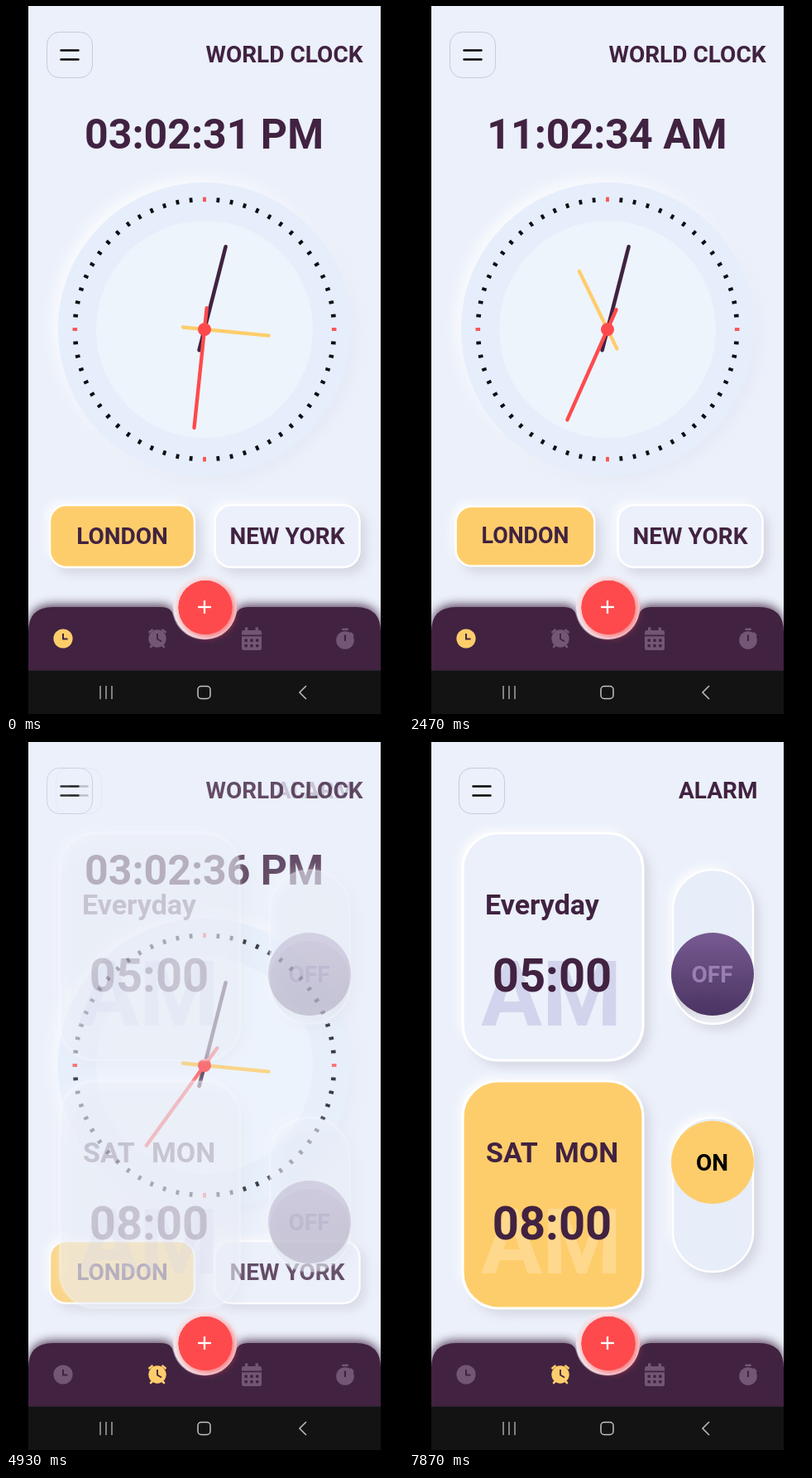
An HTML page with a canvas for the animation above (8000 ms loop, 480x854 px).

```html
<!DOCTYPE html>
<html lang="en">
<head>
<meta charset="utf-8">
<title>World clock</title>
<style>
html, body { margin: 0; width: 100%; height: 100%; overflow: hidden; background: #000; }
canvas { display: block; width: 480px; height: 854px; }
</style>
</head>
<body>
<canvas id="stage"></canvas>
<script>
const LOOP = 8000;
const canvas = document.getElementById('stage');
const g = canvas.getContext('2d');
const dpr = window.devicePixelRatio || 1;
canvas.width = 480 * dpr;
canvas.height = 854 * dpr;

const BG = [235, 240, 250], YELLOW = [254, 205, 107];
const PLUM = '#412241', RED = '#fe4a4c', GOLD = '#fecd6b', DIM = '#735675';

const clamp = v => Math.max(0, Math.min(1, v));
const ramp = (t, a, b) => clamp((t - a) / (b - a));
const ease = p => p * p * (3 - 2 * p);
const lerp = (a, b, p) => a + (b - a) * p;
const mix = (a, b, p) => `rgb(${a.map((v, i) => Math.round(lerp(v, b[i], p)))})`;

function shadow(color, blur, x, y) {
  g.shadowColor = color;
  g.shadowBlur = blur * dpr;
  g.shadowOffsetX = x * dpr;
  g.shadowOffsetY = y * dpr;
}
const noShadow = () => shadow('transparent', 0, 0, 0);

function box(x, y, w, h, r) {
  g.beginPath();
  g.roundRect(x, y, w, h, r);
}

function disc(x, y, r, fill) {
  g.beginPath();
  g.arc(x, y, r, 0, Math.PI * 2);
  g.fillStyle = fill;
  g.fill();
}

function stroke(points, color, width, cap = 'round') {
  g.beginPath();
  points.forEach(([x, y]) => g.lineTo(x, y));
  g.strokeStyle = color;
  g.lineWidth = width;
  g.lineCap = cap;
  g.lineJoin = cap === 'round' ? 'round' : 'miter';
  g.stroke();
}

function text(s, x, y, size, color = PLUM, align = 'left') {
  g.font = `700 ${size}px Roboto, sans-serif`;
  g.textAlign = align;
  g.fillStyle = color;
  g.fillText(s, x, y);
}

// Raised soft panel: white glow top left, grey shade bottom right
function panel(x, y, w, h, r, fill, border) {
  g.fillStyle = mix(BG, BG, 0);
  box(x, y, w, h, r);
  shadow('rgba(255,255,255,.75)', 10, -5, -5);
  g.fill();
  shadow('rgba(186,184,196,.5)', 14, 7, 7);
  g.fill();
  noShadow();
  g.fillStyle = fill;
  g.fill();
  g.strokeStyle = '#fff';
  g.lineWidth = border;
  g.stroke();
}

function header(x, title, right) {
  box(x + .5, 31.5, 55, 55, 15);
  g.strokeStyle = '#c8c9df';
  g.lineWidth = 1;
  g.stroke();
  for (const y of [53.5, 64.5]) stroke([[x + 17.5, y], [x + 38.5, y]], '#000', 2.4);
  text(title, right, 68, 28, PLUM, 'right');
}

function hand(deg, len, color, width) {
  const a = deg * Math.PI / 180, s = Math.sin(a), c = Math.cos(a);
  stroke([[240 - 26 * s, 390 + 26 * c], [240 + len * s, 390 - len * c]], color, width);
}

function dial(t) {
  shadow('rgba(255,255,255,.8)', 16, -6, -6);
  disc(240, 390, 177, '#e6eefb');
  shadow('rgba(205,212,230,.25)', 16, 6, 6);
  disc(240, 390, 177, '#e6eefb');
  noShadow();
  disc(240, 390, 131, '#edf4fc');
  for (let i = 0; i < 60; i++) {
    g.save();
    g.translate(240, 390);
    g.rotate(i * Math.PI / 30);
    g.fillStyle = i % 15 ? '#0c0d14' : '#f95450';
    g.fillRect(-1.9, -159.5, 3.8, 5.6);
    g.restore();
  }
  const out = ease(ramp(t, 1400, 1730)), back = ease(ramp(t, 3070, 3600));
  const sec = (t < 930 ? 31 : 32) + 2 * out + 2 * back;
  hand(14.4, 103, PLUM, 4.6);
  hand(95.6 + 238.4 * (out - back), 78, GOLD, 4.4);
  hand(sec * 6, 119.5, RED, 4.4);
  disc(240, 390.2, 8, RED);
}

function cityButton(label, x, on, press) {
  g.save();
  g.translate(x + 87.5, 639.5);
  const s = 1 - .05 * press;
  g.scale(s, s);
  panel(-87.5, -37.5, 175, 75, 20, mix(BG, YELLOW, on), 2.5);
  text(label, 0, 9, 28, PLUM, 'center');
  g.restore();
}

const press = (t, a) => ease(ramp(t, a, a + 200)) * (1 - ease(ramp(t, a + 200, a + 480)));

function clockPage(t) {
  header(49, 'WORLD CLOCK', 431.5);
  const sec = 31 + [930, 1200, 1930, 2930, 3800].filter(k => t >= k).length;
  const abroad = t >= 1200 && t < 2700;
  const dip = (a, m, b) => t < m ? 1 - ramp(t, a, m) : ramp(t, m, b);
  g.globalAlpha = Math.min(dip(1010, 1200, 1400), 1) * dip(2480, 2700, 2930) || 0;
  if (t < 2000) g.globalAlpha = dip(1010, 1200, 1400);
  text(`${abroad ? '11' : '03'}:02:${sec} ${abroad ? 'AM' : 'PM'}`, 239.5, 172, 50, PLUM, 'center');
  g.globalAlpha = 1;
  dial(t);
  const ny = ramp(t, 860, 1000) - ramp(t, 2330, 2470);
  cityButton('LONDON', 53, 1 - ny, press(t, 2200));
  cityButton('NEW YORK', 252.5, ny, press(t, 730));
}

function alarmCard(y, days, time, on) {
  panel(65, y, 218, 274, 43, mix(BG, YELLOW, on), 3.2);
  text('AM', 87, y + 231.5, 110, mix([210, 212, 237], [254, 216, 141], on));
  days.forEach(([s, x]) => text(s, x, y + 98, 34));
  text(time, 173, y + 191, 56, PLUM, 'center');

  panel(319, y + 44, 97, 186, 48.5, '#e7edf9', 2.5);
  const ky = lerp(y + 170, y + 98, on);
  g.save();
  box(320, y + 45, 95, 184, 47.5);
  g.clip();
  const shade = g.createLinearGradient(0, y + 205, 0, y + 230);
  shade.addColorStop(0, 'rgba(205,205,214,.9)');
  shade.addColorStop(1, 'rgba(240,241,246,.9)');
  g.globalAlpha *= 1 - on;
  disc(367.5, ky + 9, 49, shade);
  g.restore();
  const fill = g.createLinearGradient(0, ky - 50, 0, ky + 50);
  fill.addColorStop(0, mix([119, 90, 145], YELLOW, on));
  fill.addColorStop(1, mix([74, 52, 98], YELLOW, on));
  disc(367, ky, 50, fill);
  const isOn = on > .5;
  text(isOn ? 'ON' : 'OFF', 366.5, ky + 10, 28, isOn ? '#000' : '#9a7fb2', 'center');
}

function alarmPage(t) {
  header(60, 'ALARM', 421.5);
  alarmCard(110, [['Everyday', 92]], '05:00', 0);
  alarmCard(409, [['SAT', 93], ['MON', 176]], '08:00', ease(ramp(t, 6470, 7000)));
}

function clockIcon(color) {
  disc(69, 763, 11.6, color);
  stroke([[69, 757], [69, 763.5], [74.5, 763.5]], PLUM, 2, 'butt');
}

function alarmIcon(color) {
  stroke([[172.5, 756], [177.5, 752]], color, 2.6, 'butt');
  stroke([[193.5, 756], [188.5, 752]], color, 2.6, 'butt');
  stroke([[175, 773], [178, 770]], color, 2.6);
  stroke([[191, 773], [188, 770]], color, 2.6);
  disc(183, 763, 10.7, color);
  stroke([[183, 757], [183, 763.5], [188, 766.5]], PLUM, 1.8, 'butt');
}

function calendarIcon() {
  g.fillStyle = DIM;
  box(285, 753, 24, 24, 2.5);
  g.fill();
  g.fillRect(289, 749.5, 3.4, 5);
  g.fillRect(301.6, 749.5, 3.4, 5);
  g.fillStyle = PLUM;
  g.fillRect(285, 758.5, 24, 1.8);
  for (let i = 0; i < 6; i++) g.fillRect(288.5 + i % 3 * 6.8, 763.5 + (i > 2 ? 6.5 : 0), 3.4, 3.4);
}

function timerIcon() {
  g.fillStyle = DIM;
  g.fillRect(406.3, 750.6, 7.6, 2.4);
  disc(410, 765, 10.8, DIM);
  stroke([[417, 756.5], [419.5, 759]], DIM, 2.4);
  stroke([[410, 758.5], [410, 766]], PLUM, 2.2, 'butt');
}

function navBar(alarm) {
  g.beginPath();
  g.moveTo(27, 802);
  g.lineTo(27, 755);
  g.quadraticCurveTo(27, 725, 57, 725);
  g.lineTo(188, 725);
  g.quadraticCurveTo(200, 725, 202, 735);
  g.bezierCurveTo(212, 774, 268, 774, 278, 735);
  g.quadraticCurveTo(280, 725, 292, 725);
  g.lineTo(423, 725);
  g.quadraticCurveTo(453, 725, 453, 755);
  g.lineTo(453, 802);
  g.closePath();
  g.fillStyle = PLUM;
  shadow('rgba(65,34,65,.85)', 12, 0, -3);
  g.fill();
  noShadow();

  const glow = g.createRadialGradient(240.5, 725.5, 31, 240.5, 725.5, 39.5);
  glow.addColorStop(0, '#f6dfe3');
  glow.addColorStop(1, '#efe9f1');
  disc(240.5, 725.5, 38.5, glow);
  shadow('rgba(254,74,76,.75)', 8, 3, 3);
  disc(241, 725.5, 32.5, RED);
  noShadow();
  disc(241, 725.5, 32.5, RED);
  stroke([[232, 725], [248, 725]], '#fff', 2.3, 'butt');
  stroke([[240, 717], [240, 733]], '#fff', 2.3, 'butt');

  clockIcon(alarm ? DIM : GOLD);
  alarmIcon(alarm ? GOLD : DIM);
  calendarIcon();
  timerIcon();
}

function systemBar() {
  g.fillStyle = '#131313';
  g.fillRect(27, 801, 426, 53);
  g.fillStyle = '#2b242b';
  g.fillRect(27, 801, 426, 1);
  for (const x of [114, 121, 128]) stroke([[x, 820], [x, 836]], '#a6a6a6', 1.5, 'butt');
  box(232, 820.5, 15, 15, 4);
  g.strokeStyle = '#c4c4c4';
  g.lineWidth = 1.5;
  g.stroke();
  stroke([[363, 820], [355, 828], [363, 836]], '#bcbcbc', 1.6, 'butt');
}

function draw(t) {
  g.setTransform(dpr, 0, 0, dpr, 0, 0);
  g.globalAlpha = 1;
  noShadow();
  const bg = mix(BG, BG, 0);
  const swap = ramp(t, 4880, 5130);
  g.fillStyle = bg;
  g.fillRect(0, 0, 480, 854);
  if (swap < 1) clockPage(t);
  if (swap > 0) {
    g.globalAlpha = swap;
    g.fillStyle = bg;
    g.fillRect(27, 0, 426, 801);
    alarmPage(t);
    g.globalAlpha = 1;
  }
  navBar(t >= 4930);
  systemBar();
  g.fillStyle = '#000';
  g.fillRect(0, 0, 27, 854);
  g.fillRect(453, 0, 27, 854);
}

const start = performance.now();
function tick() {
  draw((performance.now() - start) % LOOP);
  requestAnimationFrame(tick);
}
tick();
</script>
</body>
</html>
```
